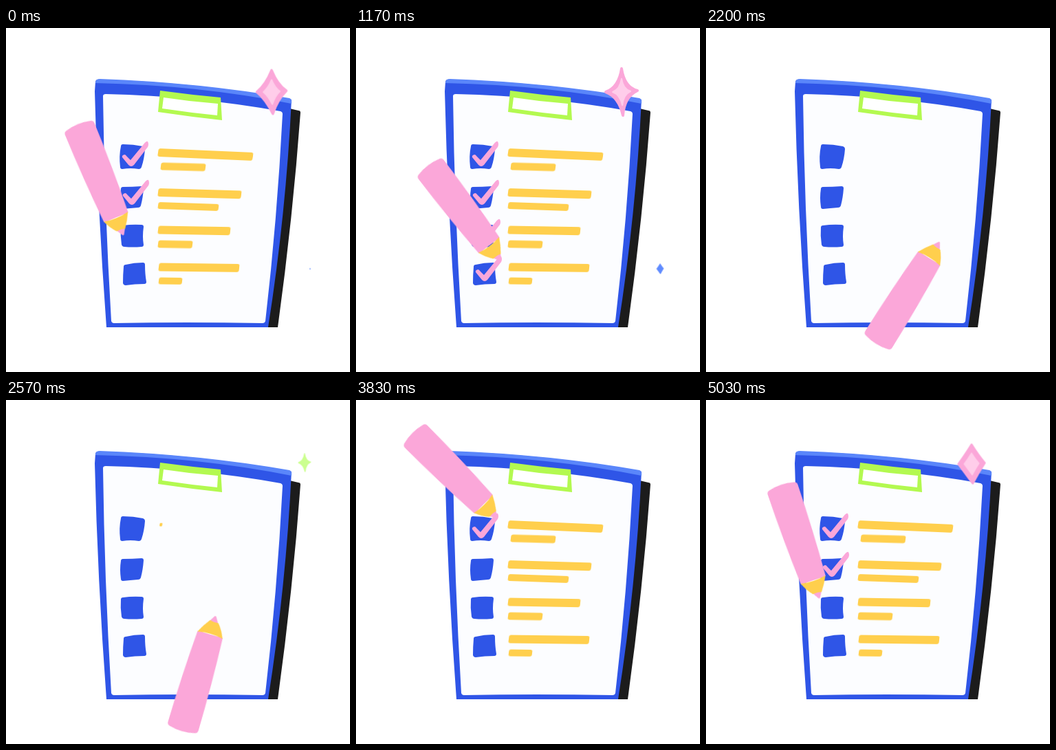
An HTML page for the animation above (5060 ms loop, 500 by 500 pixels).

```html
<!DOCTYPE html>
<html lang="en">
<head>
<meta charset="utf-8">
<title>Checklist</title>
<style>
  html, body { margin: 0; width: 100%; height: 100%; overflow: hidden; background: #fff; }
  svg { display: block; width: 100%; height: 100%; }
  .blue { fill: #2f55e7; }
  .pink { fill: #fba7d9; }
  .yellow { fill: #ffcf4d; }
  .star { stroke-width: 4; stroke-linejoin: round; }
  .tick { transform-origin: 5px -16px; }
  .reveal { fill: none; stroke: #fff; stroke-width: 15; stroke-dasharray: 1 1.2; }
</style>
</head>
<body>
<svg id="stage" viewBox="0 0 500 500">
  <path fill="#1c1c1c" d="M412 117 L425 120 Q428 120 428 123 Q417 275 395 435 H378Z"/>
  <path class="blue" d="M130 78 Q131 74 136 75 Q280 79 415 104 Q407 270 381 435 H146 Q133 260 129 92Z"/>
  <path fill="#5a86fa" d="M130 80 Q130 74 136 74 Q280 79 412 102 Q416 103 415 110 Q280 83 130 80Z"/>
  <path fill="#fcfdff" d="M141 99 Q141 96 145 96 Q278 99 399 121 Q402 122 402 125 Q394 280 377 426 Q376 429 373 429 Q260 427 157 429 Q154 429 153 426 Q143 260 141 99Z"/>
  <path fill="#b3f950" d="M224 91 Q268 97 312 101 L314 134 Q268 129 221 122Z"/>
  <path fill="#fff" d="M229 101 Q268 107 308 110 L307 127 Q267 123 227 117Z"/>
  <g class="blue">
    <path d="M170 169 Q185 169 199 172 Q202 173 202 176 Q201 190 197 202 Q196 205 193 205 Q181 203 169 205 Q166 205 166 202 Q164 186 167 172 Q167 169 170 169Z"/>
    <path d="M170 231 Q184 231 197 230 Q200 230 200 233 Q199 247 196 258 Q195 261 192 261 Q180 262 170 263 Q167 263 167 260 Q165 246 167 234 Q167 231 170 231Z"/>
    <path d="M170 287 Q184 285 197 286 Q200 286 200 289 Q198 303 200 315 Q200 318 197 318 Q184 319 172 318 Q169 318 168 315 Q166 302 167 290 Q167 287 170 287Z"/>
    <path d="M174 344 Q186 341 199 341 Q202 341 202 344 Q202 358 204 369 Q204 372 201 372 Q187 372 174 374 Q171 374 170 371 Q170 358 171 347 Q171 344 174 344Z"/>
  </g>
  <g id="bars" class="yellow"></g>
  <g id="ticks" class="pink"></g>
  <g id="stars"></g>
  <g id="pencil">
    <path class="pink" d="M-29 -19 Q-100 -23 -168 -23 Q-172 -23 -173 -19 Q-178 0 -173 19 Q-172 23 -168 23 Q-100 23 -29 19Z"/>
    <path class="pink" d="M-13 -8 L-3 -2 Q1 0 -3 2 L-13 8Z"/>
    <path class="yellow" d="M-30 -19 Q-18 -13 -9 -6 Q-11 0 -10 7 Q-18 14 -30 19 Q-26 0 -30 -19Z"/>
  </g>
  <g id="swoosh">
    <path class="pink" d="M172 145 L283 63 Q287 60 291 64 Q352 116 338 186 Q336 192 331 191 L198 174Z"/>
    <path class="pink" d="M165 163 L160 176 Q160 179 163 179 L173 178Z"/>
    <path class="yellow" d="M172 144 Q189 154 201 174 Q186 179 171 178 Q169 169 163 165 Q166 153 172 144Z"/>
  </g>
</svg>
<script>
const LOOP = 5060;
const $ = id => document.getElementById(id);

function add(parent, tag, attrs) {
  const el = document.createElementNS('http://www.w3.org/2000/svg', tag);
  for (const k in attrs) el.setAttribute(k, attrs[k]);
  return parent.appendChild(el);
}

// keys: [ms, props] within one loop that begins at `from`; the ends hold still.
function play(el, from, keys) {
  const first = [from, keys[0][1]];
  const last = [from + LOOP, { ...keys.at(-1)[1], easing: 'linear' }];
  const frames = [first, ...keys, last].map(([t, props]) => ({ ...props, offset: (t - from) / LOOP }));
  el.animate(frames, { duration: LOOP, iterations: Infinity, delay: from - LOOP });
}

// Text bars: x, y of the left end, length, height, tilt
const bars = [
  [221, 181, 138, 12, 2.5], [225, 201, 65, 11, 1.6],
  [221, 239, 121, 12, 1.6], [221, 258, 88, 10, 2],
  [221, 293.5, 105, 12, 1], [221, 314, 50, 11, 1],
  [222, 347.5, 117, 12, .7], [222, 367.5, 34, 10, .7]
];
const shrinkAt = [1510, 1370, 1330, 1220];
const growAt = [2530, 2625, 2720, 2815, 2910, 3005, 3100, 3110];

bars.forEach(([x, y, w, h, tilt], i) => {
  const g = add($('bars'), 'g', { transform: `translate(${x} ${y}) rotate(${tilt}) skewX(-6)` });
  const bar = add(g, 'rect', { y: -h / 2, height: h, rx: 3 });
  bar.style.transformOrigin = '4px 0px';
  const look = (width, scale, easing = 'linear') => ({ width: width + 'px', transform: `scale(${scale})`, easing });
  const out = shrinkAt[i >> 1], back = growAt[i];
  play(bar, 0, [
    [out, look(w, 1, 'ease-in-out')],
    [out + 450, look(12, 1)],
    [out + 550, look(8, 0)],
    [back, look(8, 0)],
    [back + 100, look(11, 1, 'ease-in-out')],
    [back + 600, look(w, 1)]
  ]);
});

// Check marks, placed by the bottom of the V
const ticks = [[182, 199], [183, 255], [185, 312], [187, 366]];
const landing = i => 3460 + 800 * i;
const popAt = [1720, 1680, 1640, 1540];

ticks.forEach(([x, y], i) => {
  const g = add($('ticks'), 'g', { transform: `translate(${x} ${y})` });
  const tick = add(g, 'g', { class: 'tick' });
  const mask = add(tick, 'mask', { id: 'reveal' + i, maskUnits: 'userSpaceOnUse', x: -30, y: -50, width: 70, height: 70 });
  const line = add(mask, 'path', { class: 'reveal', pathLength: 1, d: 'M-16 -17 L0 -1 L28 -38' });
  add(tick, 'path', {
    mask: `url(#reveal${i})`,
    d: 'M-13 -11 Q-14 -14 -10 -15 Q-8 -15 -7 -13 L-1 -7 L18 -30 Q22 -35 24 -34 Q26 -30 24 -26 L4 0 Q0 4 -4 0Z'
  });
  const t = landing(i), pop = popAt[i] + LOOP;
  play(line, 2200, [
    [t, { strokeDashoffset: 1.05 }],
    [t + 110, { strokeDashoffset: .68 }],
    [t + 320, { strokeDashoffset: 0 }]
  ]);
  play(tick, 2200, [
    [pop, { transform: 'scale(1)', easing: 'ease-out' }],
    [pop + 150, { transform: 'scale(1.09)', easing: 'ease-in' }],
    [pop + 320, { transform: 'scale(0)' }]
  ]);
});

// Stars: open as plump diamonds, then pinch into slim sparkles
const starPath = (cx, cy) =>
  `path("M0 -34 Q${cx} ${-cy} 23 -2 Q${cx} ${cy} 2 34 Q${-cx} ${cy} -23 0 Q${-cx} ${-cy} 0 -34Z")`;
const plump = starPath(12, 15), pinched = starPath(8, 11), slim = starPath(4, 7);
const twinkle = [
  [0, 0, plump], [140, .7, plump], [200, .82, plump], [240, .96, pinched],
  [320, 1, slim], [420, 1, slim], [510, .7, slim], [570, 0, slim]
];

function star(x, y, size, color, starts, core) {
  const place = add($('stars'), 'g', { transform: `translate(${x} ${y}) scale(${size})` });
  const g = add(place, 'g', {});
  const shapes = [add(g, 'path', { class: 'star', fill: color, stroke: color })];
  if (core) shapes.push(add(g, 'path', { class: 'star', fill: core, stroke: core, transform: 'scale(.56)' }));
  const run = value => starts.flatMap(s => twinkle.map(([t, scale, d]) => [s + t, value(scale, d)]));
  play(g, 4800, run(scale => ({ transform: `scale(${scale})` })));
  shapes.forEach(p => play(p, 4800, run((scale, d) => ({ d }))));
}

star(386, 93, 1, '#fba7d9', [4830, 5860, 7820, 8890], '#ffcdea');
star(442, 350, .33, '#5f8bff', [5040, 6100, 8020, 9090]);
star(434, 91, .38, '#ccff8f', [5260, 6290, 7260, 8190, 9290]);

// Pencil: time, tip x, tip y, heading
const path = [
  [2200, 340, 310, -58], [2400, 315, 316, -72], [2570, 305, 313, -73.6],
  [2700, 298, 306, -76], [2950, 278, 292, -88], [3130, 235, 255, -118],
  [3230, 185, 205, -160], [3270, 161, 178, -200], [3340, 163, 184, -262]
];
ticks.forEach(([x, y], i) => {
  const last = i === ticks.length - 1;
  const go = (dt, dx, dy, a) => path.push([landing(i) + dt, x + dx, y + dy, a]);
  go(-30, -20, -23, -288.5);
  go(0, -14, -10, -292.3);
  go(110, 0, 0, -302);
  go(300, 23, -31, last ? -313 : -317);
  go(370, 24, -27, last ? -307.3 : -315);
  if (!last) go(560, 14, -14, -296);
});
path.push(
  [6400, 245, 350, -325], [6600, 300, 338, -362], [6860, 352, 303, -402.7],
  [7040, 355, 298, -405], [7190, 348, 303, -409], [7260, 340, 310, -418]
);
play($('pencil'), 2200, path.map(([t, x, y, a]) => [t, { transform: `translate(${x}px, ${y}px) rotate(${a}deg)` }]));

// The fast swing swaps the pencil for a fan
const blink = (el, rest, swing) => play(el, 0, [
  [0, { opacity: rest, easing: 'step-end' }],
  [3255, { opacity: swing, easing: 'step-end' }],
  [3298, { opacity: rest, easing: 'step-end' }]
]);
blink($('pencil'), 1, 0);
blink($('swoosh'), 0, 1);
</script>
</body>
</html>
```
